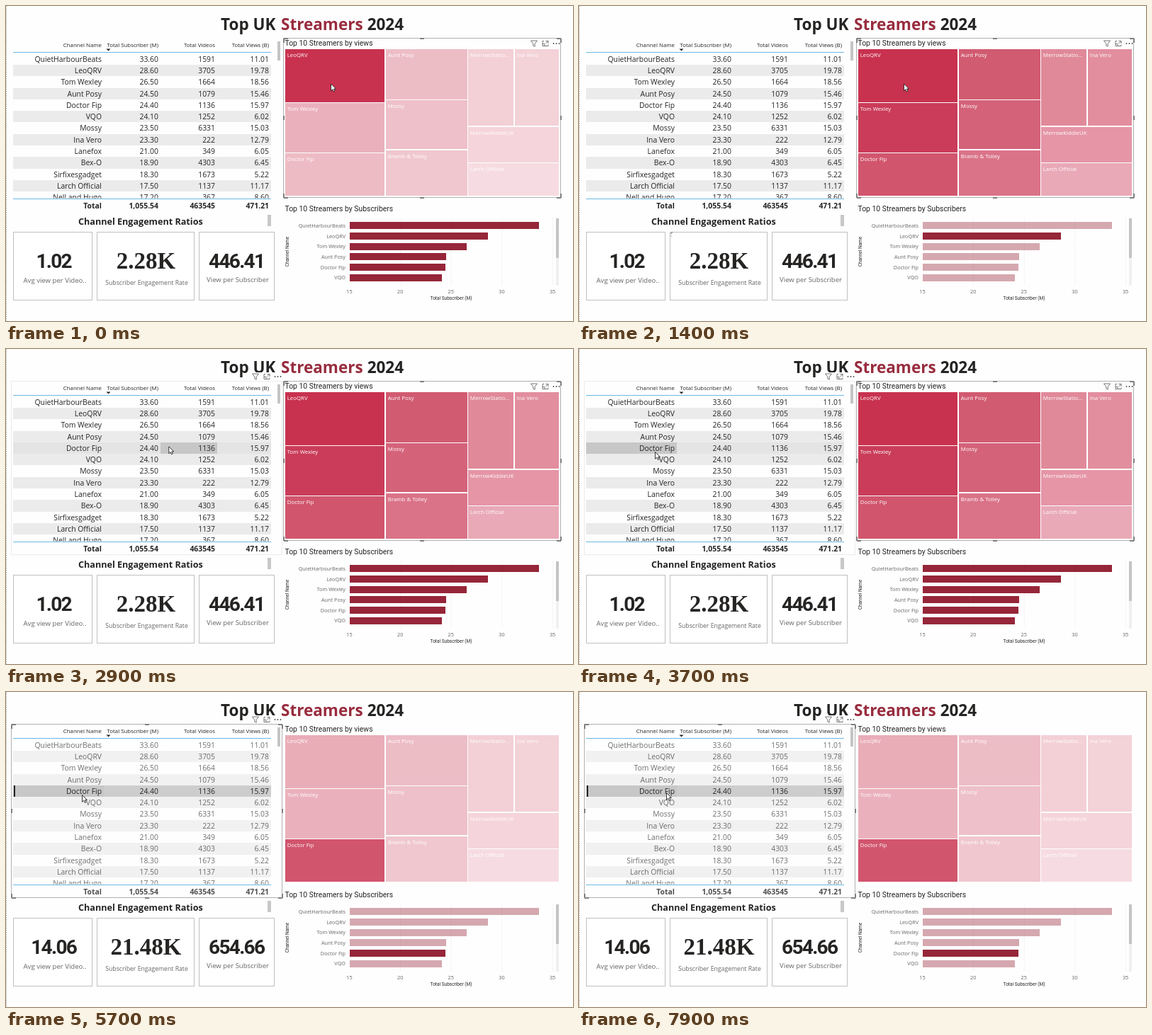
Write an HTML page that moves like this. It is 800 px wide and 445 px high and loops after 8000 ms.

```html
<!DOCTYPE html>
<html lang="en">
<head>
<meta charset="utf-8">
<title>Top UK Streamers 2024</title>
<style>
html, body { margin: 0; width: 100%; height: 100%; overflow: hidden; background: #fefefe; }
svg { display: block; width: 800px; height: 445px; }
rect { shape-rendering: crispEdges; }
text { font-family: "Open Sans", "Noto Sans", sans-serif; fill: #252423; white-space: pre; }
.title { font-size: 22.5px; font-weight: 700; }
.red { fill: #982c3e; }
.caption { font-family: Roboto, sans-serif; font-size: 10.4px; }
.head { font-size: 7.85px; }
.cell { font-size: 10.4px; }
.total { font-size: 10.4px; font-weight: 700; }
.section { font-size: 12.6px; font-weight: 700; }
.din { font-family: Roboto, sans-serif; font-size: 28px; font-weight: 700; letter-spacing: -1.7px; }
.serif { font-family: "Liberation Serif", serif; font-size: 33px; font-weight: 700; }
.note { font-size: 9.5px; fill: #666; }
.tile { font-size: 7.85px; fill: #fff; }
.axis { font-size: 7.3px; fill: #666; }
.axisTitle { font-family: Roboto, sans-serif; font-size: 6.5px; }
</style>
</head>
<body>
<svg id="stage" viewBox="0 0 800 445"></svg>
<script>
const LOOP = 8000, STEP = 100;
const stage = document.getElementById('stage');

function add(parent, tag, attrs, content) {
  const el = document.createElementNS('http://www.w3.org/2000/svg', tag);
  for (const key in attrs) el.setAttribute(key, attrs[key]);
  if (content !== undefined) el.textContent = content;
  parent.appendChild(el);
  return el;
}
const group = (parent = stage) => add(parent, 'g', {});
const box = (parent, x, y, width, height, fill, more) =>
  add(parent, 'rect', { x, y, width, height, fill, ...more });
const line = (parent, x1, y1, x2, y2, stroke, more) =>
  add(parent, 'line', { x1, y1, x2, y2, stroke, ...more });
const label = (parent, cls, x, y, content, anchor = 'start') =>
  add(parent, 'text', { class: cls, x, y, 'text-anchor': anchor }, content);
const show = (el, on) => el.setAttribute('visibility', on ? 'visible' : 'hidden');

// Page and title
line(stage, 0.5, 0, 0.5, 445, '#aaa', { 'stroke-dasharray': '1.5 1.5' });
label(stage, 'title', 303, 34, 'Top UK');
label(stage, 'title red', 388, 34, 'Streamers');
label(stage, 'title', 561, 34, '2024', 'end');

// Table
const ROW = 16.3, TOP = 66.6;
const edges = [10, 138, 218, 298, 374];
const rights = [135, 215, 295, 371];
const rows = [
  ['QuietHarbourBeats', '33.60', '1591', '11.01'],
  ['LeoQRV', '28.60', '3705', '19.78'],
  ['Tom Wexley', '26.50', '1664', '18.56'],
  ['Aunt Posy', '24.50', '1079', '15.46'],
  ['Doctor Fip', '24.40', '1136', '15.97'],
  ['VQO', '24.10', '1252', '6.02'],
  ['Mossy', '23.50', '6331', '15.03'],
  ['Ina Vero', '23.30', '222', '12.79'],
  ['Lanefox', '21.00', '349', '6.05'],
  ['Bex-O', '18.90', '4303', '6.45'],
  ['Sirfixesgadget', '18.30', '1673', '5.22'],
  ['Larch Official', '17.50', '1137', '11.17'],
  ['Nell and Hugo', '17.20', '367', '8.60']
];
const PICKED = 4;

const clip = add(stage, 'clipPath', { id: 'rowsClip' });
box(clip, 8, 66, 368, 205.5, '#000');
const body = add(stage, 'g', { 'clip-path': 'url(#rowsClip)' });
const bands = group(body);
rows.forEach((row, i) => {
  if (i % 2) box(bands, 10, TOP + i * ROW, 364, ROW, '#ebebeb');
});
const pickedBand = box(body, 10, TOP + PICKED * ROW, 364, ROW, '#e4e4e4');
const hoverRow = box(body, 10, 0, 364, ROW, '#000', { 'fill-opacity': 0.1 });
const hoverCell = box(body, 0, 0, 0, ROW, '#000');
const pickedMark = box(body, 11, TOP + PICKED * ROW, 2, ROW, '#252423');
const rowTexts = rows.map((row, i) => {
  const g = group(body);
  row.forEach((v, c) => label(g, 'cell', rights[c], 78.6 + i * ROW, v, 'end'));
  return g;
});

['Channel Name', 'Total Subscriber (M)', 'Total Videos', 'Total Views (B)']
  .forEach((v, c) => label(stage, 'head', rights[c], 58, v, 'end'));
add(stage, 'path', { d: 'M141.5 60.5h6l-3 3z', fill: '#252423' });
box(stage, 10, 65, 364, 1, '#6cb8e4');
box(stage, 10, 272, 364, 1, '#6cb8e4');
const totals = group();
['Total', '1,055.54', '463545', '471.21']
  .forEach((v, c) => label(totals, 'total', rights[c], 285.6, v, 'end'));
const thumb = box(stage, 383, 50, 4, 27, '#c4c4c4');

// Ratio cards
label(stage, 'section', 102, 309, 'Channel Engagement Ratios');
box(stage, 369, 295, 5, 16, '#c8c8c8');
const cards = [
  [10.5, 111, 'din', 370, 68, 391.3, 'Avg view per Video..', 9.6],
  [128.5, 137, 'serif', 371, 197.5, 393.8, 'Subscriber Engagement Rate', 8.7],
  [272.5, 106, 'din', 370, 326, 390, 'View per Subscriber', 9.5]
].map(([x, w, cls, y, mid, noteY, note, size]) => {
  box(stage, x, 319.5, w, 96, '#fff', { stroke: '#c0c0c0' });
  label(stage, 'note', mid + 1, noteY, note, 'middle').style.fontSize = size + 'px';
  return label(stage, cls, mid - (cls === 'din' ? 0.8 : 0), y, '', 'middle');
});
const ratios = {
  all: ['1.02', '2.28K', '446.41'],
  first: ['5.34', '7.72K', '691.58'],
  second: ['14.06', '21.48K', '654.66']
};
const spinner = add(stage, 'path', {
  d: 'M132 319.5a2.5 2.5 0 0 0-2 2.5M129.6 324.5l.8 1', fill: 'none', stroke: '#555'
});

// Treemap
label(stage, 'caption', 393.5, 55.5, 'Top 10 Streamers by views');
const tiles = [
  [394, 61, 140, 75, '#c8324f', rows[1][0]],
  [394, 137, 140, 70, '#ca3c59', rows[2][0]],
  [394, 208, 140, 60, '#d1556d', rows[4][0]],
  [536, 61, 115, 71, '#d15b71', rows[3][0]],
  [536, 133, 115, 69, '#d4637a', rows[6][0]],
  [536, 204, 115, 64, '#da7388', 'Bramb & Tolley'],
  [652, 61, 64, 108, '#e08999', 'MerrowStatio...'],
  [718, 61, 62, 108, '#e28e9e', rows[7][0]],
  [652, 171, 128, 50, '#e595a6', 'MerrowKiddieUK'],
  [652, 222, 128, 46, '#e9a9b7', rows[11][0]]
].map(([x, y, w, h, fill, name]) => {
  const tile = box(stage, x, y, w, h, fill);
  label(stage, 'tile', x + 2.8, y + 11, name);
  return tile;
});

// Bar chart
label(stage, 'caption', 393.5, 289.5, 'Top 10 Streamers by Subscribers');
const chartX = v => 485 + (v - 15) * 14.33;
for (let v = 15; v <= 35; v += 5) {
  if (v > 15) line(stage, chartX(v), 300, chartX(v), 395, '#e2e2e2', { 'stroke-dasharray': '1 2' });
  label(stage, 'axis', chartX(v) - 0.5, 406, v, 'middle');
}
const bars = rows.slice(0, 6).map((row, i) => {
  const mid = 310.4 + i * 14.62;
  label(stage, 'axis', 479, mid + 2.8, row[0], 'end');
  return box(stage, 485, mid - 5, chartX(row[1]) - 485, 10, '#962639');
});
label(stage, 'axisTitle', 628, 415.3, 'Total Subscriber (M)', 'middle');
label(stage, 'axisTitle', 0, 0, 'Channel Name', 'middle')
  .setAttribute('transform', 'translate(399 347) rotate(-90)');
box(stage, 776, 300, 4, 95, '#f0f0f0');
box(stage, 776, 300, 4, 56, '#c4c4c4');

// Selection frames and header icons
function frame(x, y, w, h) {
  const g = group();
  box(g, x, y, w, h, 'none', { stroke: '#b0b0b0' });
  for (const fx of [0, 0.5, 1]) for (const fy of [0, 0.5, 1]) {
    const px = x + fx * w, py = y + fy * h;
    if (fx !== 0.5) box(g, px - 1, py - 6 * fy, 2, 6, '#808080');
    if (fy !== 0.5) box(g, px - 6 * fx, py - 1, 6, 2, '#808080');
  }
  return g;
}
function icons(x, y, parent) {
  const g = add(parent, 'g', { transform: `translate(${x} ${y})`, fill: 'none', stroke: '#777' });
  add(g, 'path', { d: 'M-4.5-4h9L1.2.2V4.2L-1.2 3V.2z' });
  add(g, 'path', { d: 'M14-3.5h-2v7h8v-2M16.5-3.5h3.5v3.5M20-3.5l-3.5 3.5M12 .5h3v3' });
  for (const dx of [27.5, 31.5, 35.5]) add(g, 'circle', { cx: dx, cy: 0, r: 0.9, fill: '#444', stroke: 'none' });
}
const mapFrame = frame(391.5, 45.5, 391, 225);
icons(745, 53, mapFrame);
const tableHover = box(stage, 7.5, 45.5, 382, 245, 'none', { stroke: '#ebebeb' });
const tableFrame = frame(7.5, 45.5, 382, 245);
const tableIcons = group();
box(tableIcons, 345, 33, 45, 12, '#fff');
icons(352, 39, tableIcons);

const pointer = add(stage, 'path', {
  d: 'M0 0v9.8l2.3-2.1 1.5 3.3 1.7-.8-1.5-3.2h3z', fill: '#fff', stroke: '#222', 'stroke-width': 0.9
});

// Pointer path: time, x, y
const path = [
  [0, 458.5, 110], [1700, 458.5, 110], [2200, 351.5, 131.5], [2700, 260, 136],
  [3400, 107.5, 145.5], [5800, 107.5, 145.5], [6700, 114, 130], [7200, 114, 130],
  [7800, 123.5, 142.5], [LOOP, 123.5, 142.5]
];
function pointerAt(t) {
  const i = path.findIndex(p => p[0] > t);
  const [t0, x0, y0] = path[i - 1], [t1, x1, y1] = path[i];
  const k = (t - t0) / (t1 - t0), e = k * k * (3 - 2 * k);
  return [x0 + (x1 - x0) * e, y0 + (y1 - y0) * e];
}

// The scroll thumb is longer for a moment after the table reacts
function thumbHeight(t) {
  if (t >= 2000 && t < 2600) return 47;
  return t >= 4500 && t < 5100 ? 70 : 27;
}

const fade = (els, active) => els.forEach((el, i) =>
  el.setAttribute('opacity', active < 0 || i === active ? 1 : 0.4));

function draw(t) {
  const picked = t >= 4300;
  fade(tiles, t < 1300 ? 0 : t >= 4500 ? 2 : -1);
  fade(bars, t >= 200 && t < 1500 ? 1 : t >= 4500 ? PICKED : -1);
  const values = t >= 4600 ? ratios.second : t >= 300 && t < 1400 ? ratios.first : ratios.all;
  cards.forEach((card, i) => { card.textContent = values[i]; });
  show(spinner, (t >= 1300 && t < 1500) || (t >= 4400 && t < 4600));
  thumb.setAttribute('height', thumbHeight(t));

  const [x, y] = pointerAt(t);
  pointer.setAttribute('transform', `translate(${x} ${y})`);
  const onTable = x < 390;
  const row = Math.floor((y - TOP) / ROW);
  const onRow = x < 374;
  show(hoverRow, onRow);
  show(hoverCell, onRow);
  if (onRow) {
    const col = edges.findIndex(edge => edge > x) - 1;
    const top = TOP + row * ROW;
    hoverRow.setAttribute('y', top);
    hoverCell.setAttribute('y', top);
    hoverCell.setAttribute('x', edges[col]);
    hoverCell.setAttribute('width', edges[col + 1] - edges[col]);
    hoverCell.setAttribute('fill-opacity', picked && row === PICKED ? 0.03 : 0.13);
  }
  show(pickedBand, picked);
  show(pickedMark, picked);
  bands.setAttribute('opacity', picked ? 0.7 : 1);
  rowTexts.forEach((g, i) => {
    const strong = !picked || i === PICKED || (onRow && i === row);
    g.setAttribute('opacity', strong ? 1 : 0.65);
  });
  totals.setAttribute('opacity', picked ? 0.8 : 1);
  show(mapFrame, !picked);
  show(tableFrame, picked);
  show(tableHover, onTable && !picked);
  show(tableIcons, onTable);
}

const start = performance.now();
function tick() {
  const t = (performance.now() - start) % LOOP;
  draw(Math.floor(t / STEP) * STEP);
  requestAnimationFrame(tick);
}
draw(0);
requestAnimationFrame(tick);
</script>
</body>
</html>
```
